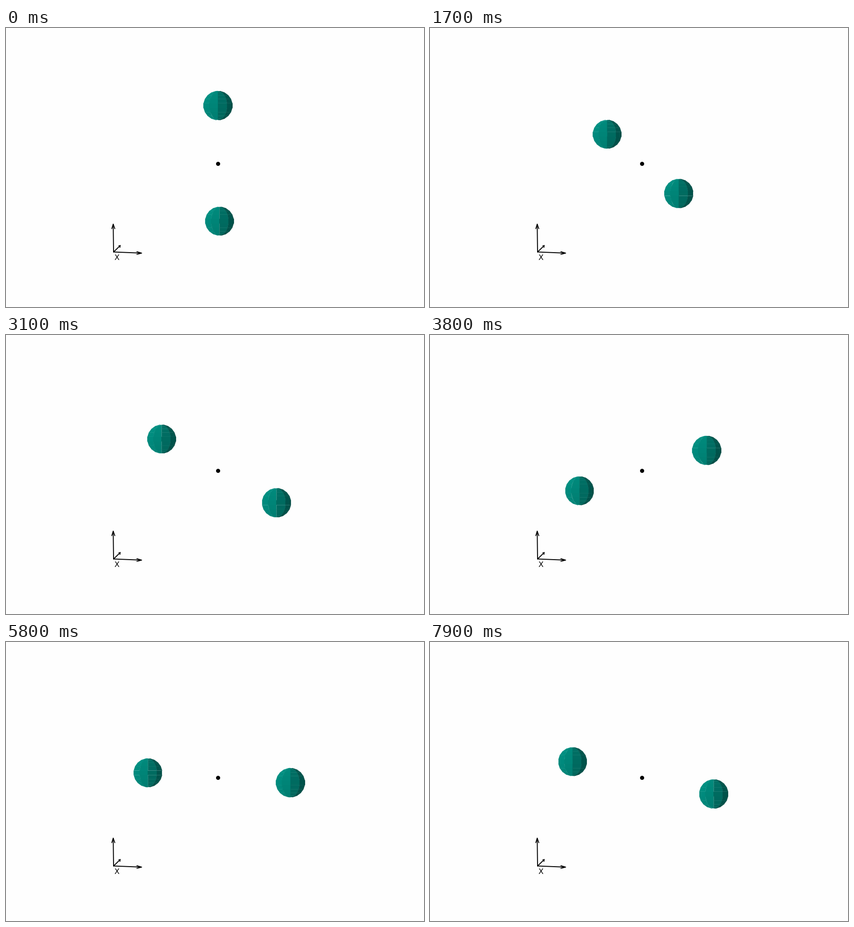
A matplotlib script that plays this animation: 917x611 px, repeating every 8 s.

```python
import numpy as np
import matplotlib.pyplot as plt
from matplotlib.animation import FuncAnimation
from matplotlib.collections import PolyCollection

W, H, DPI = 917, 611, 64
PT = 72 / DPI  # points per pixel
FRAMES, STEP_MS = 80, 100


def smooth(n, times, values):
    """Cubic Hermite curve through a few points."""
    t, v = np.array(times, float), np.array(values, float)
    slope = np.gradient(v, t)
    i = int(np.clip(np.searchsorted(t, n, side="right") - 1, 0, len(t) - 2))
    h = t[i + 1] - t[i]
    s = (n - t[i]) / h
    return ((2 * s**3 - 3 * s**2 + 1) * v[i] + (s**3 - 2 * s**2 + s) * h * slope[i]
            + (3 * s**2 - 2 * s**3) * v[i + 1] + (s**3 - s**2) * h * slope[i + 1])


def spread(n):
    """Half of the horizontal distance between the balls."""
    return smooth(n, [0, 9, 18, 25, 38, 46, 58, 68, 79],
                  [-1.7, 38.1, 83.1, 109.5, 139.5, 149.4, 156.3, 157.2, 154.8])


def swing(n):
    """Damped vertical oscillation, on an axis that leans slightly down."""
    amp = smooth(n, [0, 6, 12, 18, 25, 38, 55, 67, 79],
                 [126.5, 99, 84.5, 75, 69.5, 57, 42, 34.6, 28.1])
    phase = smooth(n, [0, 9, 25, 38, 46, 58, 79],
                   [0, 274, 729, 1107, 1350, 1705, 2340])
    return amp * np.cos(np.radians(phase)) - 0.047 * spread(n)


def ball_mesh():
    """Faceted unit ball seen from the front: quads and their colours."""
    lons = np.radians([-90, -36, 0, 39, 70, 90])
    lats = np.radians(np.arange(-81, 82, 18))
    shades = [1.05, 1.0, 0.81, 0.63, 0.56]
    quads, colors = [], []
    for a, b, k in zip(lons[:-1], lons[1:], shades):
        for lo, hi in zip(lats[:-1], lats[1:]):
            quads.append([(np.sin(u) * np.cos(v), -np.sin(v))
                          for u, v in ((a, lo), (b, lo), (b, hi), (a, hi))])
            light = k * (0.975 + 0.05 * np.sin((lo + hi) / 2))
            colors.append((0, 0.53 * light, 0.478 * light))
    return np.array(quads), colors


fig = plt.figure(figsize=(W / DPI, H / DPI), dpi=DPI, facecolor="#fefefe")
ax = fig.add_axes([0, 0, 1, 1])
ax.set_xlim(0, W)
ax.set_ylim(H, 0)
ax.axis("off")


def line(points, width=2):
    ax.plot(*zip(*points), color="black", lw=width * PT,
            solid_capstyle="round", solid_joinstyle="miter")


def arrow(start, tip, barbs):
    line([start, tip])
    line([barbs[0], tip, barbs[1]], 1.8)


origin = (236, 490.5)
arrow(origin, (235.2, 429.5), [(232, 439.5), (238.8, 439.5)])
arrow(origin, (297.5, 493), [(287, 489.7), (287, 495.8)])
arrow(origin, (250.5, 476.5), [(247.5, 476.8), (250, 480.5)])
ax.text(242.7, 508, "X", family="DejaVu Sans", fontsize=16.3 * PT,
        ha="center", va="baseline")

quads, colors = ball_mesh()
balls = [PolyCollection(quads, facecolors=colors, edgecolors=colors,
                        linewidths=0.35 * PT) for _ in range(2)]
for ball in balls:
    ax.add_collection(ball, autolim=False)
ax.add_patch(plt.Circle((465.3, 297.5), 4.5, color="black", lw=0, zorder=3))


def update(n):
    x, y = spread(n), swing(n)
    mid = np.array([466.7 + x / 160, 297.2 - 0.006 * y])
    arm = np.array([x, -y])
    for ball, side, radius in zip(balls, (-1, 1), (31.5, 32)):
        ball.set_verts(quads * radius + mid + side * arm)
    return balls


anim = FuncAnimation(fig, update, frames=FRAMES, interval=STEP_MS,
                     repeat=True, repeat_delay=0, blit=False)
plt.show()
```
